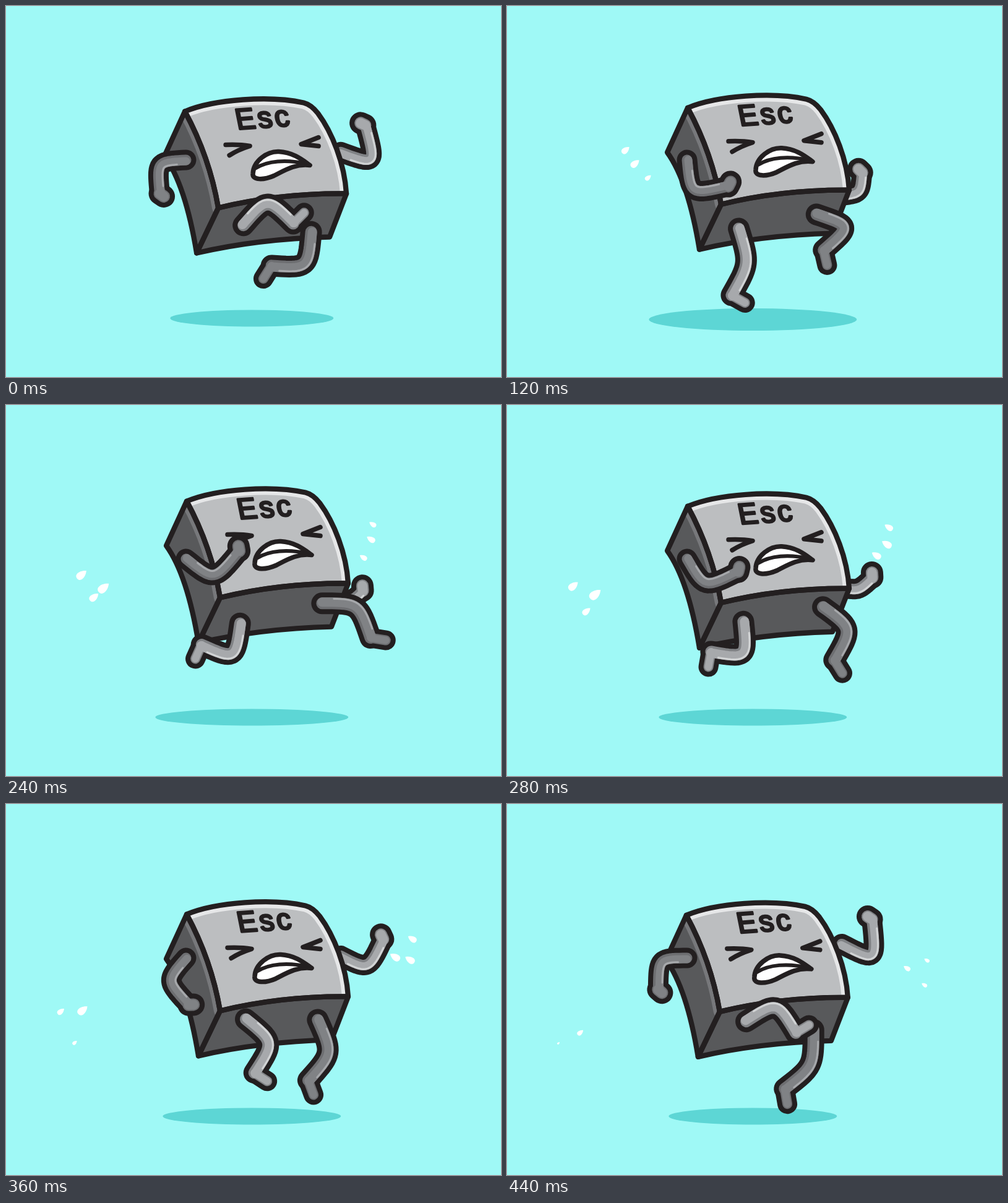
Animation, 800 px wide and 600 px high, one loop 0.48 s. Source, as an HTML page with a canvas:

```html
<!DOCTYPE html>
<html lang="en">
<head>
<meta charset="utf-8">
<title>Esc key on the run</title>
<style>
  html, body { margin: 0; width: 100%; height: 100%; overflow: hidden; background: #9ff9f6; }
  canvas { display: block; width: 800px; height: 600px; }
</style>
</head>
<body>
<canvas id="stage" width="800" height="600"></canvas>
<script>
const ctx = document.getElementById('stage').getContext('2d');
const LOOP = 480, STEP = 40, LANDING = 80;
const INK = '#231f20', SKY = '#9ff9f6';

// Looping swing: a mean plus harmonics, each given as [amplitude, peak time].
function wave(t, mean, ...harmonics) {
  return harmonics.reduce((sum, [amp, peak], i) =>
    sum + amp * Math.cos(2 * Math.PI * (i + 1) * (t - peak) / LOOP), mean);
}

// Looping Hermite curve through a few key values.
function spline(t, times, values) {
  const n = times.length;
  const time = i => times[(i + n) % n] + LOOP * Math.floor(i / n);
  const at = i => values[(i + n) % n];
  const slope = i => (at(i + 1) - at(i - 1)) / (time(i + 1) - time(i - 1));
  const i = times.findLastIndex(key => key <= t);
  const span = time(i + 1) - time(i), u = (t - time(i)) / span;
  const ease = u * u * (3 - 2 * u);
  return at(i) + (at(i + 1) - at(i)) * ease
    + span * u * (1 - u) * (slope(i) * (1 - u) - slope(i + 1) * u);
}

// Angles are in degrees: 0 points down, 90 points right.
function step([x, y], angle, length) {
  const a = angle * Math.PI / 180;
  return [x + Math.sin(a) * length, y + Math.cos(a) * length];
}

function chain(root, ...bones) {
  const joints = [root];
  for (const [angle, length] of bones) joints.push(step(joints.at(-1), angle, length));
  return joints;
}

function leg(hip, thigh, shin, ankle) {
  return chain(hip, [thigh, 59], [shin, 59], [shin + ankle, 25]);
}

function arm(shoulder, upper, fore, length, reach) {
  return chain(shoulder, [upper, length * reach], [fore, length * 1.1 * reach], [fore + 50, 8]);
}

function nearLeg(t) {
  const beats = [0, 80, 160, 240, 360];
  const hip = [wave(t, 381, [7, 390]), wave(t, 354, [6, 110])];
  return leg(hip, spline(t, beats, [139, 39, 6, -8, 51]),
    spline(t, beats, [45, -38, -22, -114, -33]), 90);
}

function farLeg(t) {
  const beats = [0, 160, 240, 280, 440];
  const hip = [wave(t, 502, [9, 255]), wave(t, 343, [23, 460])];
  return leg(hip, spline(t, beats, [-5, 92, 90, 54, 0]),
    spline(t, beats, [-94, -29, 19, -30, -52]), 62);
}

function nearArm(t) {
  return arm([291, 249], wave(t, -18, [73, 215]), wave(t, 73, [74, 208]),
    49, wave(t, 1.08, [0.14, 190]));
}

function farArm(t) {
  const shoulder = [541, wave(t, 276, [50, 190])];
  return arm(shoulder, wave(t, 80, [20, 160]), wave(t, 165, [32, 25]),
    63, wave(t, 0.64, [0.36, 445]));
}

function stroke(path, width, color) {
  ctx.lineWidth = width;
  ctx.strokeStyle = color;
  ctx.stroke(path);
}

function fill(path, color) {
  ctx.fillStyle = color;
  ctx.fill(path);
}

function clipped(shape, paint) {
  ctx.save();
  ctx.clip(shape);
  paint();
  ctx.restore();
}

// A line beside the bend from a through the corner k to b.
function sideLine([a, k, b], dist, from = 0, to = 1) {
  const path = new Path2D();
  for (let i = 0; i <= 20; i++) {
    const t = from + (to - from) * i / 20, s = 1 - t;
    const [x, y] = [0, 1].map(c => s ** 3 * a[c] + 3 * s * t * k[c] + t ** 3 * b[c]);
    const [dx, dy] = [0, 1].map(c => s * s * (k[c] - a[c]) + t * t * (b[c] - k[c]));
    const len = Math.hypot(dx, dy) || 1;
    path.lineTo(x + dy / len * dist, y - dx / len * dist);
  }
  return path;
}

function limb(joints, { width, tip, side, shade, base, light }) {
  const bone = sideLine(joints, 0);
  const end = new Path2D(`M${joints[2]}L${joints[3]}`);
  stroke(bone, width + 16, INK);
  stroke(end, tip + 16, INK);
  stroke(bone, width, shade);
  stroke(end, tip, shade);
  stroke(sideLine(joints, 2 * side), width - 4, base);
  stroke(end, tip - 4, base);
  stroke(sideLine(joints, (width / 2 - 2) * side, 0.12, 0.92), 3, light);
}

const MID = { shade: '#6d6e71', base: '#808285', light: '#a7a9ac' };
const PALE = { shade: '#808285', base: '#a7a9ac', light: '#d1d3d4' };
const LEG = { width: 19, tip: 16, side: 1 };
const ARM = { width: 17, tip: 20, side: 1 };

const topEdge = 'M292,166C340,146 430,140 484,152Q496,155 507,169C530,200 550,250 553,299';
const topFace = new Path2D(topEdge + 'Q445,298 346,322Q332,240 292,166Z');
const rim = new Path2D(topEdge);
const sideFace = new Path2D('M292,166L259,238Q293,285 311,395L346,322Q332,240 292,166Z');
const sideEdge = new Path2D('M292,166Q332,240 346,322');
const frontFace = new Path2D('M346,322Q445,298 553,299L526,369Q410,372 311,395Z');
const eyes = new Path2D('M358,220Q380,219 397,222Q378,228 364,237M508,208L480,219L508,222');
const mouth = new Path2D('M402,266C403,246 425,230 444,231C468,232 484,246 494,253'
  + 'C470,250 452,262 436,270C420,277 400,278 402,266Z');
const bite = new Path2D('M406,258C425,246 455,243 490,251');

function label() {
  ctx.save();
  ctx.transform(1, -0.07, 0.2, 1, 422, 192);
  ctx.font = '47px "Liberation Sans", Arial, sans-serif';
  ctx.letterSpacing = '4px';
  ctx.textAlign = 'center';
  ctx.fillStyle = ctx.strokeStyle = INK;
  ctx.lineWidth = 3.2;
  ctx.fillText('Esc', 0, 0);
  ctx.strokeText('Esc', 0, 0);
  ctx.restore();
}

function keycap(t) {
  ctx.save();
  ctx.translate(-3 * Math.max(0, wave(t, 0, [1, 470])) ** 4,
    wave(t, 1.3, [12, 415], [4.5, 132], [2.2, 435]));
  fill(sideFace, '#58595b');
  clipped(sideFace, () => stroke(sideEdge, 20, '#77787b'));
  fill(frontFace, '#58595b');
  fill(topFace, '#bcbec0');
  clipped(topFace, () => stroke(rim, 20, '#e6e7e8'));
  for (const face of [sideFace, frontFace, topFace]) stroke(face, 8.3, INK);
  label();
  stroke(eyes, 7.5, INK);
  fill(mouth, '#fff');
  stroke(bite, 6, INK);
  stroke(mouth, 7.5, INK);
  ctx.restore();
}

// Wide on landing, then shrinking until just before the next one.
function shadow(t) {
  const age = (t - LANDING + LOOP) % LOOP;
  const grow = Math.max(0, (age - 400) / 80);
  const rx = Math.min(168, 172 - age / 10) + 38 * grow;
  const ry = Math.max(13.5, 20 - age / 20) + 6.5 * grow;
  ctx.beginPath();
  ctx.ellipse(397.3, 505 + (ry - 13.5) * 0.45, rx, ry, 0, 0, 2 * Math.PI);
  ctx.fillStyle = '#5dd6d5';
  ctx.fill();
}

// Each drop: start x, y, distance flown, upward or downward push, size, ripeness.
const sprays = [
  { start: 80, life: 360, drag: 2.2, tilt: -0.7, drops: [
    [223, 224, -140, 77, 8.5, 0.2],
    [236, 241, -130, 120, 8, 0.28],
    [260, 276, -142, 8, 9.5, 0.1]
  ] },
  { start: 160, life: 280, drag: 1.5, tilt: 3.7, drops: [
    [537, 194, 142, -27, 7, 0.08],
    [535, 212, 140, -5, 8, 0.1],
    [533, 264, 114, -84, 8, 0.05]
  ] }
];
const dropShape = new Path2D('M1.3,0C.4,.9 -1,1 -1,0C-1,-1 .4,-.9 1.3,0Z');

function spray(t, { start, life, drag, tilt, drops }) {
  const u = (t - start) / life;
  if (u < 0 || u > 1) return;
  for (const [x, y, reach, push, peak, ripe] of drops) {
    const size = peak * Math.sin(Math.PI * (ripe + 0.72 * u));
    ctx.save();
    ctx.translate(x + reach * (1 - (1 - u) ** drag), y + push * u + 86 * u * u);
    ctx.rotate(tilt);
    ctx.scale(size, size);
    fill(dropShape, '#fff');
    ctx.restore();
  }
}

function draw(now) {
  const t = Math.floor(now % LOOP / STEP) * STEP;
  ctx.fillStyle = SKY;
  ctx.fillRect(0, 0, 800, 600);
  ctx.lineCap = ctx.lineJoin = 'round';
  shadow(t);
  limb(farArm(t), { ...ARM, ...PALE, side: -1 });
  keycap(t);
  limb(nearArm(t), { ...ARM, ...MID });
  limb(farLeg(t), { ...LEG, ...MID });
  limb(nearLeg(t), { ...LEG, ...PALE });
  for (const s of sprays) spray(t, s);
  requestAnimationFrame(draw);
}
requestAnimationFrame(draw);
</script>
</body>
</html>
```
